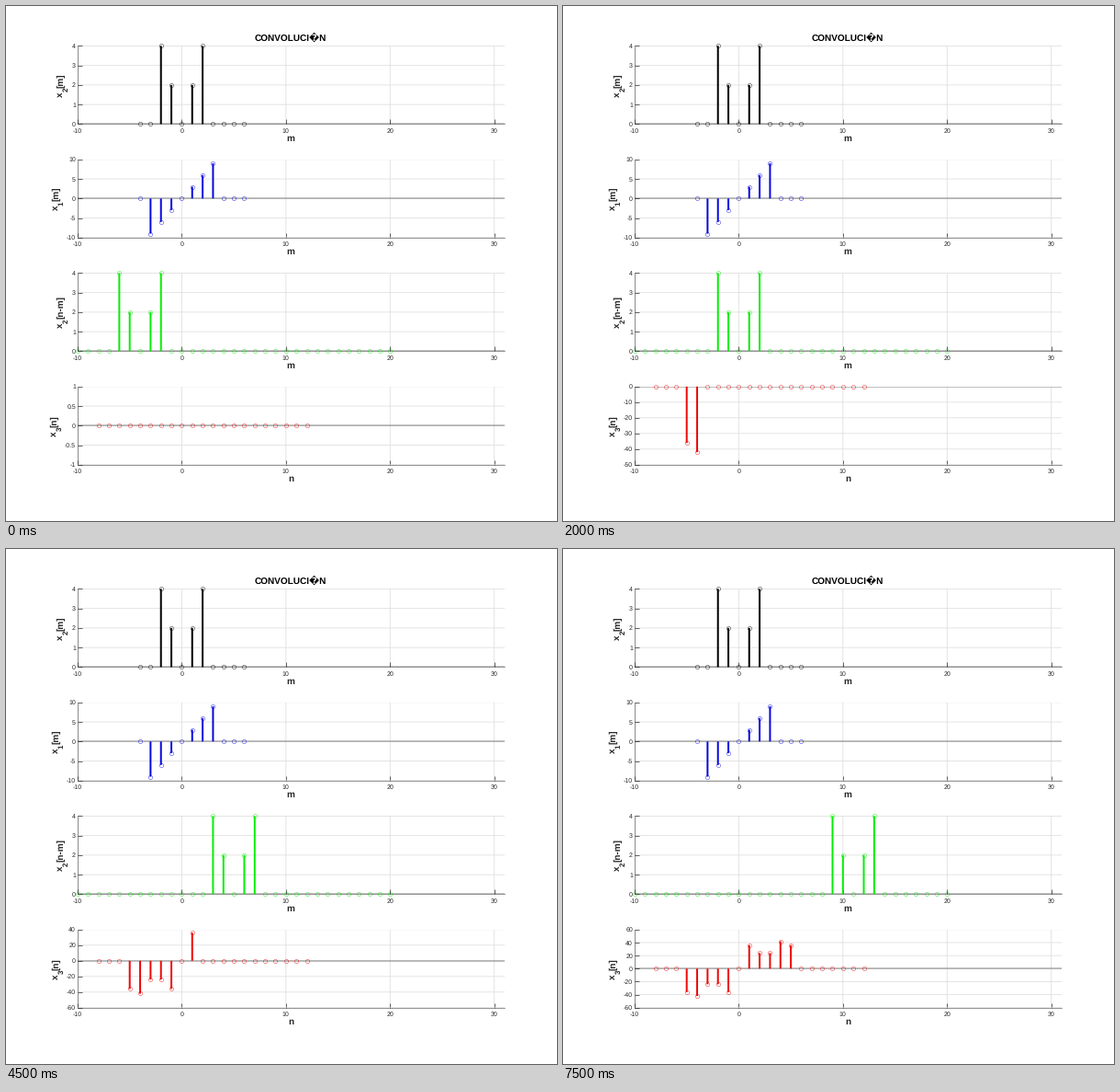
Recreate the animation shown at these times as a matplotlib script. Size 600 by 560 pixels, loop 8000 ms.

```python
import numpy as np
import matplotlib.pyplot as plt
from matplotlib.animation import FuncAnimation

W, H, DPI = 600, 560, 100
PX = 72 / DPI
LEFT, WIDTH, HEIGHT = 78, 465, 85
TOPS = [43.4, 166.8, 290.4, 413.8]
DARK = "#262626"

plt.rcParams.update({
    "font.family": ["Liberation Sans", "DejaVu Sans"],
    "axes.unicode_minus": False,
    "text.hinting": "none",
})

fig = plt.figure(figsize=(W / DPI, H / DPI), dpi=DPI, facecolor="white")


def label(x, y, text, size=10, color=DARK, ha="center", **kw):
    return fig.text(x / W, 1 - y / H, text, fontsize=size * PX, weight="bold",
                    color=color, ha=ha, va="baseline", **kw)


def side_label(x, y, sub, arg):
    """Vertical label x_sub[arg], centred on y."""
    def part(dx, text, size):
        return label(x + dx, y, text, size, ha="left",
                     rotation=90, rotation_mode="anchor")

    parts = [part(0, "x", 10), part(5.5, sub, 8), part(0, f"[{arg}]", 10)]
    renderer = fig.canvas.get_renderer()
    sizes = [p.get_window_extent(renderer).height for p in parts]
    pos = y + sum(sizes) / 2
    for p, size in zip(parts, sizes):
        p.set_y(1 - pos / H)
        pos -= size
    return parts


def set_yaxis(ax, lo, hi, step):
    ticks = np.arange(lo, hi + step / 2, step)
    ax.set_ylim(lo, hi)
    ax.set_yticks(ticks, [f"{t:g}" for t in ticks])


def make_panel(top, xlabel):
    ax = fig.add_axes([LEFT / W, 1 - (top + HEIGHT) / H, WIDTH / W, HEIGHT / H])
    ax.patch.set_visible(False)
    ax.set_xlim(-10, 31)
    ax.set_xticks(range(-10, 31, 10))
    ax.set_axisbelow(True)
    ax.grid(color="#dedede", lw=0.8 * PX, snap=False)
    ax.tick_params(direction="in", length=4.6 * PX, width=0.7 * PX,
                   color=DARK, labelcolor=DARK, labelsize=7 * PX)
    ax.tick_params(axis="x", pad=4 * PX)
    ax.tick_params(axis="y", pad=2 * PX)
    ax.spines[["top", "right"]].set_visible(False)
    ax.spines[["left", "bottom"]].set(linewidth=0.5 * PX, color=DARK)
    label(LEFT + WIDTH / 2 - 0.4, top + HEIGHT + 18.4, xlabel)
    return ax


class Stem:
    def __init__(self, ax, x, color):
        self.x = x
        ax.axhline(0, color="black", lw=0.45 * PX, zorder=2)
        self.bars = ax.vlines(x, 0, 0, color=color, lw=2 * PX, zorder=3,
                              clip_on=False, snap=False)
        self.dots, = ax.plot(x, 0 * x, "o", ms=4.3 * PX, mfc="none", mec=color,
                             mew=0.4 * PX, zorder=4, clip_on=False, snap=False)

    def set(self, y):
        self.bars.set_segments([[(a, 0), (a, b)] for a, b in zip(self.x, y)])
        self.dots.set_data(self.x, y)


def x1(m):
    return np.where(abs(m) <= 3, 3 * m, 0)


def x2(m):
    return np.where(abs(m) <= 2, 2 * abs(m), 0)


m = np.arange(-4, 7)
shift_m = np.arange(-10, 21)
n = np.arange(-8, 13)
x3 = np.array([np.sum(x1(m) * x2(i - m)) for i in n])

label(LEFT + WIDTH / 2 - 0.4, 37.2, "CONVOLUCI\ufffdN", color="black")
ax_a, ax_b, ax_c, ax_d = [make_panel(t, s) for t, s in zip(TOPS, "mmmn")]
mid_a, mid_b, mid_c, mid_d = [t + HEIGHT / 2 for t in TOPS]
side_label(62.2, mid_a, "2", "m")
side_label(57, mid_b, "1", "m")
side_label(62.2, mid_c, "2", "n-m")
wide_label = side_label(55.3, mid_d, "3", "n")
near_label = side_label(57, mid_d, "3", "n")
set_yaxis(ax_a, 0, 4, 1)
set_yaxis(ax_b, -10, 10, 5)
set_yaxis(ax_c, 0, 4, 1)

Stem(ax_a, m, "black").set(x2(m))
Stem(ax_b, m, "#0808e0").set(x1(m))
moving = Stem(ax_c, shift_m, "#08ee08")
result = Stem(ax_d, n, "#ee0808")


def output_range(y):
    lo, hi = y.min(), y.max()
    if lo == hi:
        return -1, 1, 0.5
    step = 10 if hi - lo <= 50 else 20
    return step * np.floor(lo / step), step * np.ceil(hi / step), step


def draw(k):
    moving.set(x2(k - 4 - shift_m))
    y = np.where(n <= k - 8, x3, 0)
    result.set(y)
    set_yaxis(ax_d, *output_range(y))
    for wide, near in zip(wide_label, near_label):
        wide.set_visible(not y.any())
        near.set_visible(y.any())


anim = FuncAnimation(fig, draw, frames=16, interval=500, repeat=True, repeat_delay=0)
plt.show()
```
